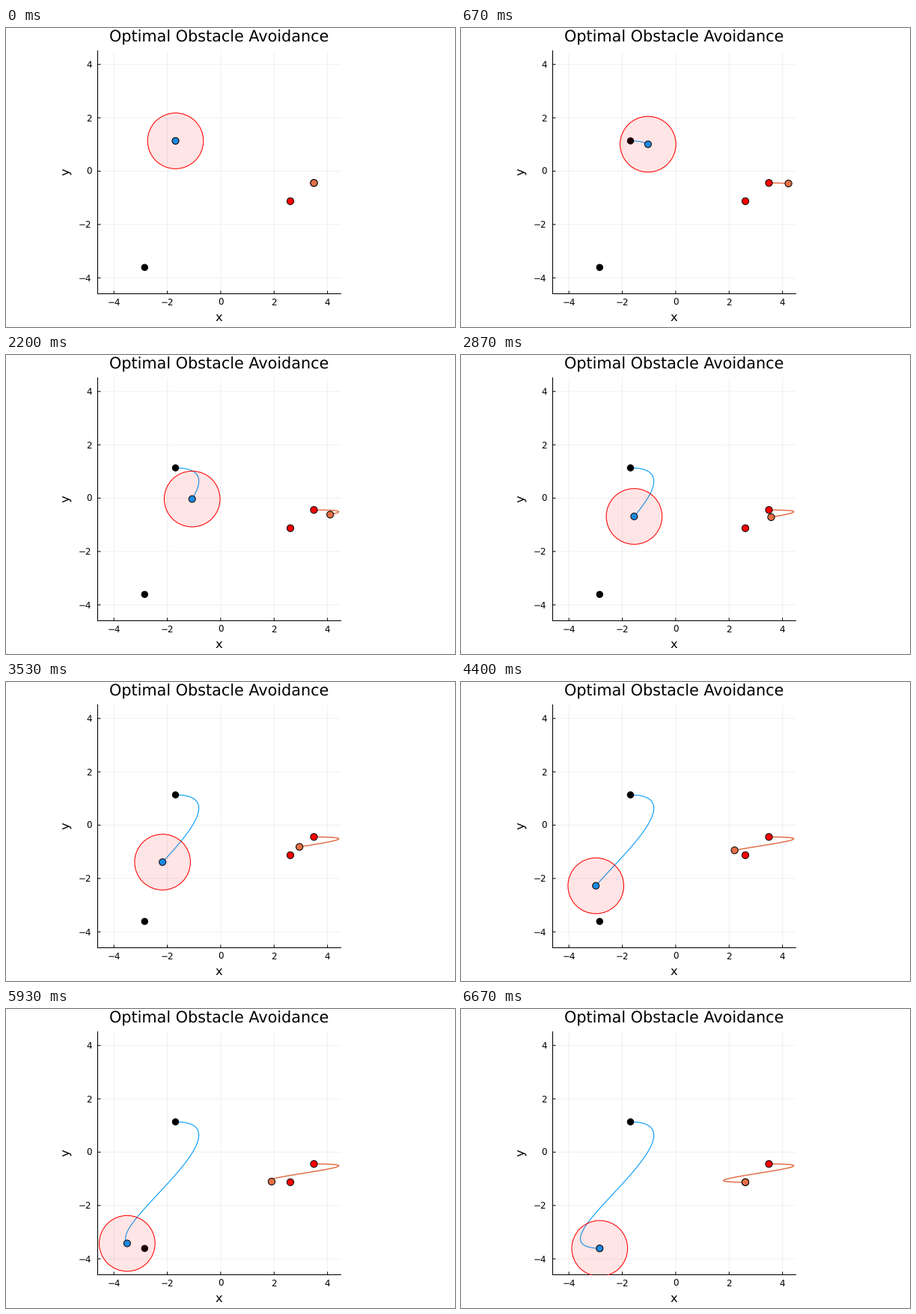
A matplotlib script for the animation above (6.74 s loop, 600 px wide and 400 px high).

```python
import numpy as np
import matplotlib.pyplot as plt
from matplotlib.animation import FuncAnimation
from matplotlib.patches import Circle

W, H, DPI = 600, 400, 100
PT = 72 / DPI  # points per pixel
TICK_MS, LOOP_MS = 20, 6740
FPS, STEPS = 15, 101
LEFT, RIGHT, TOP, BOTTOM = 122.5, 447.5, 30.5, 355.5
X0, Y0, UNIT = 286.9, 191.5, 35.68  # pixel position of the origin, pixels per unit
BLUE, ORANGE = "#009afa", "#e36f47"

plt.rcParams.update({"font.family": "DejaVu Sans", "path.snap": False,
                     "text.hinting": "no_hinting"})
fig = plt.figure(figsize=(W / DPI, H / DPI), dpi=DPI, facecolor="white")
ax = fig.add_axes([LEFT / W, 1 - BOTTOM / H, (RIGHT - LEFT) / W, (BOTTOM - TOP) / H])
ax.set_xlim(LEFT, RIGHT)
ax.set_ylim(BOTTOM, TOP)  # pixel coordinates, y downwards
ax.set_xticks([])
ax.set_yticks([])
for side in ("top", "right"):
    ax.spines[side].set_visible(False)
for side in ("left", "bottom"):
    ax.spines[side].set_linewidth(1.05 * PT)


def label(x, y, text, px, ha="center", va="baseline", **kw):
    ax.text(x, y, text, fontsize=px * PT, ha=ha, va=va, **kw)


def segment(xs, ys, **kw):
    return ax.plot(xs, ys, solid_capstyle="butt", **kw)[0]


def dot(x, y, color, r, z):
    return ax.add_patch(Circle((x, y), r, facecolor=color, edgecolor="black",
                               linewidth=PT, zorder=z))


# Grid, ticks and their labels
grid = dict(color="black", alpha=0.06, lw=PT, zorder=0)
tick = dict(color="black", lw=PT, zorder=2.5)
for v in range(-4, 5, 2):
    x, y = X0 + v * UNIT, Y0 - v * UNIT
    segment([x, x], [TOP, BOTTOM], **grid)
    segment([LEFT, RIGHT], [y, y], **grid)
    segment([x, x], [BOTTOM, BOTTOM - 4], **tick)
    segment([LEFT, LEFT + 4], [y, y], **tick)
    name = str(v).replace("-", "\u2212")
    label(x, 371.2, name, 11.9)
    label(114.5, y + 4.4, name, 11.9, ha="right")

label(284.8, 18.8, "Optimal Obstacle Avoidance", 20.8)
label(284.6, 391.5, "x", 16.4)
label(88.5, 192.4, "y", 16.4, ha="right", va="center", rotation=90)

# Trajectories over normalised time
s = np.linspace(0, 1, STEPS)
ease = s**2 * (3 - 2 * s)
blue_x = 226.5 + 319.8 * s - 891 * s**2 + 309 * s**3 + 221 * s**4
blue_y = 151 + 169.3 * ease - s**2 * (1 - s) * (10 + 16 * (1 - s))
orange_x = 411.5 + 371 * s - 1182 * s**2 + 779.5 * s**3
orange_y = 207.3 + 24.4 * ease

blue_path = segment([], [], color=BLUE, lw=1.1 * PT, zorder=3)
orange_path = segment([], [], color=ORANGE, lw=1.5 * PT, zorder=3)
for k in (0, -1):
    dot(blue_x[k], blue_y[k], "black", 4.2, 4)
    dot(orange_x[k], orange_y[k], "red", 4.6, 4)
blue_dot = dot(blue_x[0], blue_y[0], BLUE, 4.5, 5)
orange_dot = dot(orange_x[0], orange_y[0], ORANGE, 4.6, 5)
zone = ax.add_patch(Circle((blue_x[0], blue_y[0]), 37.3, facecolor=(1, 0, 0, 0.1),
                           edgecolor="red", linewidth=1.05 * PT, zorder=6))


def draw(frame):
    # Steps run at 15 per second, with starts rounded to 10 ms
    ms = frame * TICK_MS + 15
    i = min(ms * FPS // 1000, STEPS - 1)
    blue_path.set_data(blue_x[:i + 1], blue_y[:i + 1])
    orange_path.set_data(orange_x[:i + 1], orange_y[:i + 1])
    blue_dot.center = zone.center = blue_x[i], blue_y[i]
    orange_dot.center = orange_x[i], orange_y[i]
    return blue_path, orange_path, blue_dot, orange_dot, zone


anim = FuncAnimation(fig, draw, frames=LOOP_MS // TICK_MS, init_func=lambda: draw(0),
                     interval=TICK_MS, repeat=True, repeat_delay=0)
plt.show()
```
